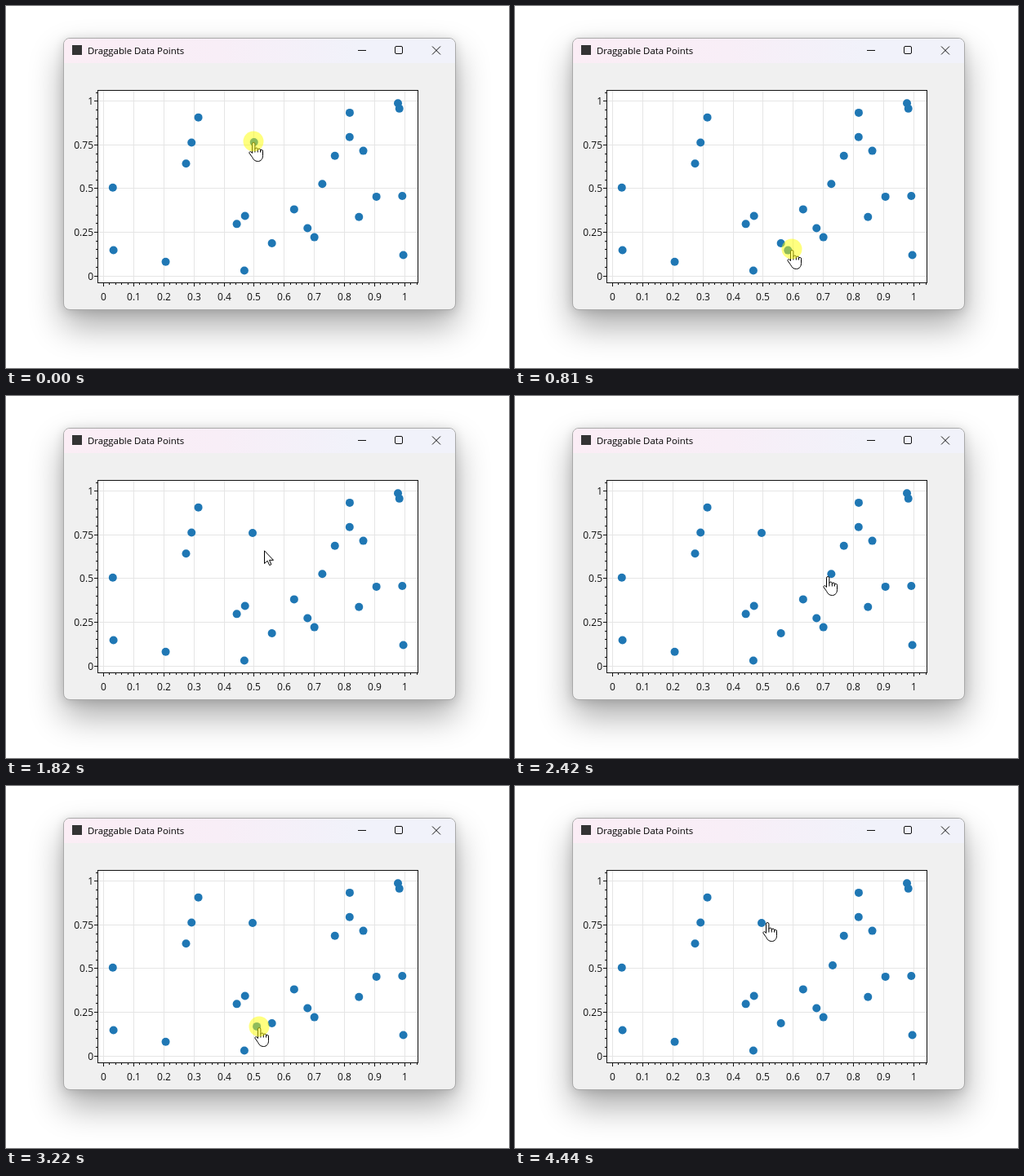
Animation of 616 by 444 pixels, one loop 4540 ms. Source, as an HTML page:

```html
<!DOCTYPE html>
<html lang="en">
<head>
<meta charset="utf-8">
<title>Draggable Data Points</title>
<style>
  html, body { margin: 0; width: 100%; height: 100%; overflow: hidden; background: #fff; }
  .window {
    position: absolute; left: 70px; top: 39px; width: 479px; height: 332px;
    border: 1px solid #a9a9a9; border-radius: 8px; overflow: hidden; background: #f0f0f0;
    box-shadow: 0 20px 42px rgba(0, 0, 0, .33), 0 2px 13px rgba(0, 0, 0, .14);
  }
  .title { height: 30px; background: linear-gradient(90deg, #fbedf5, #f8eef7 40%, #f1f2fa 75%, #f1f2fa); }
  svg { position: absolute; left: 0; top: 0; }
  text { font: 12px "Open Sans", "Noto Sans", sans-serif; fill: #111; }
  .caption { font-size: 11.4px; fill: #000; }
</style>
</head>
<body>
<div class="window"><div class="title"></div></div>
<svg width="616" height="444" viewBox="0 0 616 444">
  <rect x="81" y="48" width="12" height="12" fill="#333"/>
  <text class="caption" x="100" y="59">Draggable Data Points</text>
  <g fill="none" stroke="#111">
    <path d="M431 54.5h10"/>
    <rect x="476.5" y="49.5" width="9" height="9" rx="1.5"/>
    <path d="M522 49.5l10 10M532 49.5l-10 10"/>
  </g>
  <rect x="112.5" y="103.5" width="392" height="236" fill="#fff"/>
  <path id="grid" stroke="#e5e5e5" fill="none"/>
  <path id="ticks" stroke="#111" fill="none"/>
  <g id="labels"></g>
  <g id="dots" fill="#1f77b4"></g>
  <rect x="112.5" y="103.5" width="392" height="236" fill="none" stroke="#111"/>
  <g id="cursor" fill="#fff" stroke="#000" stroke-linejoin="round">
    <path id="arrow" d="M.5.8V16.5L4.2 13.2 6.7 18.6 8.9 17.6 6.5 12.3H11.5Z"/>
    <g id="hand" transform="translate(0 1)">
      <path d="M-1.5 12.5V1.2a1.7 1.7 0 0 1 3.4 0V7.6a1.7 1.5 0 0 1 3.4 0V8.4a1.6 1.5 0 0 1 3.2.3V9.6a1.5 1.5 0 0 1 3 .6V15.5c0 4-2.3 7-6 7-3.7 0-5.3-1.8-6.9-5L-4.9 12.6c-.8-1.8 1.6-2.7 2.5-1.2Z"/>
      <path d="M1.9 7.5v4M5.3 8v3.5M8.5 9v2.5" fill="none"/>
    </g>
    <circle id="halo" cy="-1" r="12.5" fill="#ff0" fill-opacity=".5" stroke="none"/>
  </g>
</svg>
<script>
const NS = "http://www.w3.org/2000/svg";
const $ = id => document.getElementById(id);
const add = (parent, tag, attrs) => {
  const el = document.createElementNS(NS, tag);
  for (const k in attrs) el.setAttribute(k, attrs[k]);
  return parent.appendChild(el);
};

// Axes
const px = v => 119.6 + v * 368.7;
const py = v => 331.05 - v * 214.3;
const snap = v => Math.floor(v) + .5;
const label = (s, x, y, anchor) =>
  add($("labels"), "text", { x, y, "text-anchor": anchor }).textContent = s;
let grid = "", ticks = "";

for (let i = 0; i <= 52; i++) {
  const x = snap(px(i / 50)), major = i % 5 === 0;
  ticks += `M${x} 340v${major ? 4 : 2}`;
  if (major) {
    grid += `M${x} 104V339`;
    label(String(i / 50), x, 361, "middle");
  }
}
for (let i = 0; i <= 21; i++) {
  const y = snap(py(i / 20)), major = i % 5 === 0;
  ticks += `M112 ${y}h${major ? -4 : -2}`;
  if (major) {
    grid += `M113 ${y}H504`;
    label(String(i / 20), 107, y + 4.5, "end");
  }
}
$("grid").setAttribute("d", grid);
$("ticks").setAttribute("d", ticks);

// Knuth's subtractive random generator
function subtractive(seed) {
  const M = 2 ** 31 - 1, s = [];
  const sub = (a, b) => a < b ? a - b + M : a - b;
  let a = 161803398 - seed, b = 1;
  s[55] = a;
  for (let i = 1; i < 55; i++) {
    s[21 * i % 55] = b;
    [a, b] = [b, sub(a, b)];
  }
  for (let round = 0; round < 4; round++)
    for (let i = 1; i <= 55; i++) s[i] = sub(s[i], s[1 + (i + 30) % 55]);
  let n = 0;
  return () => {
    const i = n % 55 + 1, j = (n + 21) % 55 + 1;
    n++;
    return (s[i] = sub(s[i], s[j])) / M;
  };
}

// Scatter: all x values are drawn first, then all y values
const COUNT = 25;
const random = subtractive(0);
const sample = () => Array.from({ length: COUNT }, random);
const xs = sample(), ys = sample();
const home = xs.map((x, i) => [px(x), py(ys[i])]);
const dots = home.map(([cx, cy]) => add($("dots"), "circle", { cx, cy, r: 5 }));

// Drags: which dot, first and last step, resting places before and after
const drags = [
  { dot: 3, from: 0, to: 15, before: [302, 168], after: [302, 168] },
  { dot: 0, from: 25, to: 38, before: home[0], after: [389, 220] }
];

// Pointer way points: step, x, y
const keys = [
  [0, 303, 167], [4, 216, 246], [7, 300, 304], [8, 339, 299], [10, 369, 247],
  [12, 331, 194], [13, 322, 188], [16, 303, 169], [18, 316, 189], [24, 383, 221],
  [26, 352, 199], [29, 251, 246], [32, 310, 296], [36, 392, 241], [38, 389, 220],
  [42, 348, 189], [44, 309, 167]
];
const STEPS = 45, LOOP = 4540, LAG = .12;

// Slope at a way point, flat where the coordinate turns round
function slope(k, axis) {
  const a = keys[k - 1] || keys[k], b = keys[k], c = keys[k + 1] || b;
  const turns = a !== b && b !== c && (b[axis] - a[axis]) * (c[axis] - b[axis]) <= 0;
  return turns ? 0 : (c[axis] - a[axis]) / (c[0] - a[0]);
}

// Hermite curve through the way points
function pointer(step) {
  const k = Math.max(0, keys.findIndex(p => step <= p[0]) - 1);
  const p = keys[k], q = keys[k + 1], d = q[0] - p[0], u = (step - p[0]) / d;
  const ease = u * u * (3 - 2 * u);
  return [1, 2].map(axis =>
    p[axis] + (q[axis] - p[axis]) * ease
    + d * u * (1 - u) * ((1 - u) * slope(k, axis) - u * slope(k + 1, axis)));
}

// A dragged dot trails slightly behind the pointer
function dotAt(d, i) {
  if (i < d.from) return d.before;
  if (i >= d.to) return d.after;
  const now = pointer(i), last = pointer((i + STEPS - 1) % STEPS);
  return now.map((v, axis) => v + (last[axis] - v) * LAG);
}

function draw(i) {
  const [x, y] = pointer(i);
  const held = drags.some(d => i >= d.from && i < d.to);
  let over = held;
  for (const d of drags) {
    const [cx, cy] = dotAt(d, i);
    dots[d.dot].setAttribute("cx", cx);
    dots[d.dot].setAttribute("cy", cy);
    over = over || Math.hypot(cx - x, cy - y) < 12;
  }
  $("cursor").setAttribute("transform", `translate(${x} ${y})`);
  $("hand").style.display = over ? "" : "none";
  $("arrow").style.display = over ? "none" : "";
  $("halo").style.display = held ? "" : "none";
}

const start = performance.now();
function tick() {
  const t = (performance.now() - start) % LOOP;
  draw(Math.min(STEPS - 1, Math.floor((t + 10) / LOOP * STEPS)));
  requestAnimationFrame(tick);
}
tick();
</script>
</body>
</html>
```
